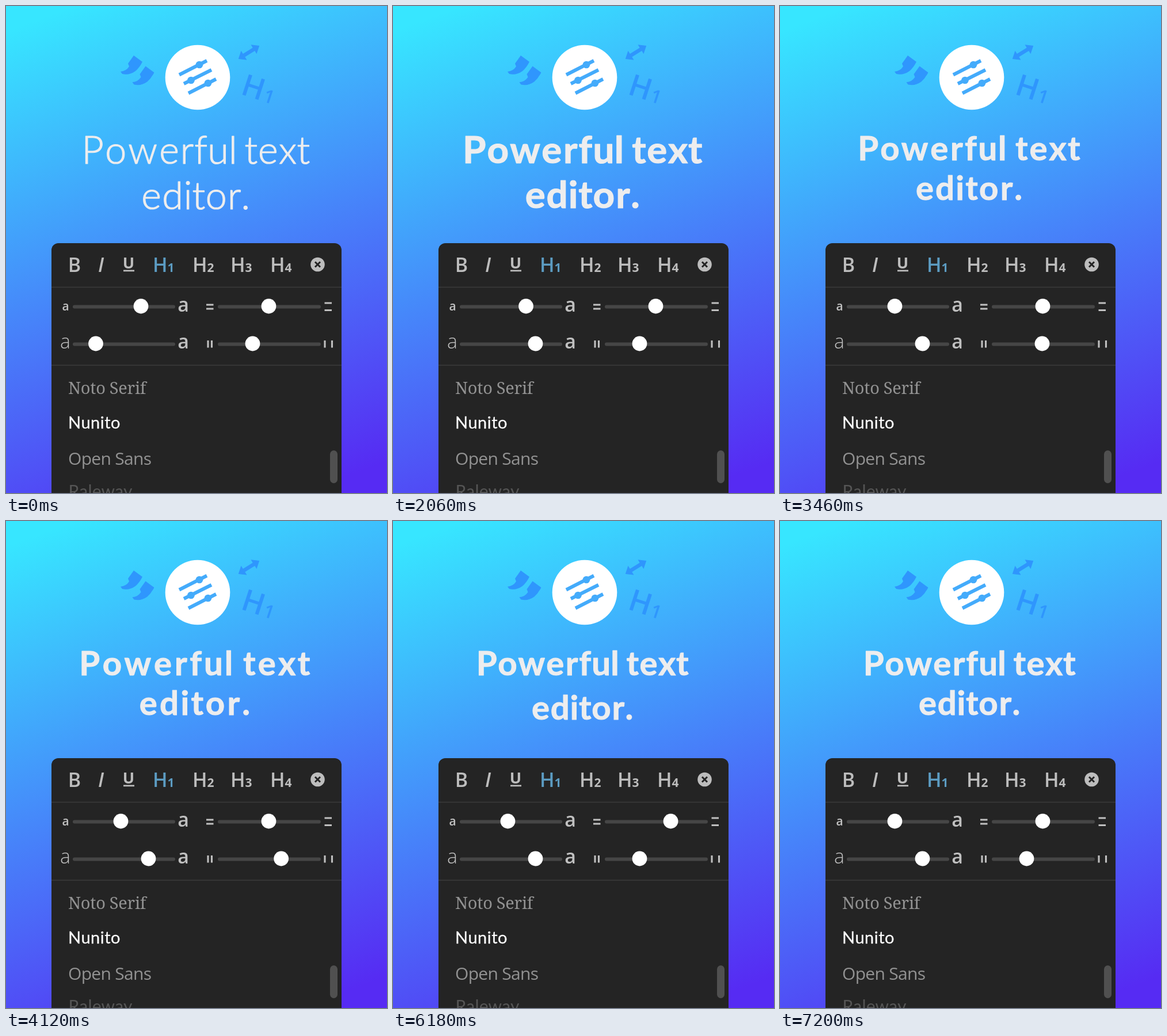
Recreate the animation shown at these times as an HTML page. Size 662x846 px, loop 8000 ms.

```html
<!DOCTYPE html>
<html lang="en">
<head>
<meta charset="utf-8">
<title>Powerful text editor</title>
<style>
html, body { margin: 0; width: 100%; height: 100%; overflow: hidden; }
body { background: linear-gradient(160deg, #37e6ff 4%, #4687fa 50%, #562bf3 95%); }
svg { display: block; width: 662px; height: 846px; font-family: "Open Sans", "Noto Sans", sans-serif; }
#title { font-family: Lato, "Open Sans", sans-serif; fill: #ededee; stroke: #ededee; stroke-linejoin: round; text-anchor: middle; }
.deco { fill: #2f96fd; font-weight: 600; }
.bar { fill: #bdbdbd; font-weight: 600; font-size: 34px; }
.bar .sub { font-size: 21px; font-weight: 700; }
.mid { text-anchor: middle; }
.list { font-size: 30px; fill: #929292; }
.lato { font-family: Lato, sans-serif; }
.track { stroke: #464646; stroke-width: 6; stroke-linecap: round; }
.mark { stroke: #c0c0c0; stroke-width: 3.1; fill: none; }
</style>
</head>
<body>
<svg viewBox="0 0 662 846">
  <g class="deco">
    <path id="quote" d="M222 86L237 97Q232 107 225 113Q214 121 202 118L199 114Q209 113 214 105L212 100Z"/>
    <use href="#quote" x="20.5" y="18.5"/>
    <path transform="translate(422 80.5) rotate(-32)" d="M-21.5 0L-10-9.5V-3.3H10V-9.5L21.5 0L10 9.5V3.3H-10V9.5Z"/>
    <g transform="translate(406 152.5) rotate(18)">
      <text font-size="52">H</text>
      <text x="41" font-size="32">1</text>
    </g>
  </g>

  <circle cx="333" cy="124" r="56.3" fill="#fff"/>
  <path d="M301 119.5L349 95M309 135L357 111M317 151.5L365 127" stroke="#44abfb" stroke-width="6"/>
  <g fill="#44abfb">
    <circle cx="336" cy="102" r="6.3"/>
    <circle cx="321.5" cy="129" r="6.3"/>
    <circle cx="351" cy="134" r="6.3"/>
  </g>

  <g id="title"><text>Powerful text</text><text>editor.</text></g>

  <rect x="79" y="412" width="504" height="460" rx="12" fill="#242424"/>
  <path d="M79 488.5H583M79 624H583" stroke="#3b3b3b" stroke-width="1.5"/>

  <g class="bar">
    <text class="mid" x="119" y="461.5">B</text>
    <text class="mid" x="165" y="461.5" font-style="italic">I</text>
    <text class="mid" x="213" y="456" style="font-size:27px;font-weight:700">U</text>
    <rect x="204" y="458.5" width="19" height="2.7"/>
    <g fill="#5c9cc2"><text x="255" y="461.5">H</text><text class="sub" x="280.5" y="461.5">1</text></g>
    <text x="324" y="461.5">H</text><text class="sub" x="349.5" y="461.5">2</text>
    <text x="390" y="461.5">H</text><text class="sub" x="415.5" y="461.5">3</text>
    <text x="459" y="461.5">H</text><text class="sub" x="484.5" y="461.5">4</text>
    <circle cx="541.5" cy="449" r="12.3"/>
    <path d="M537 444.5l9 9m0-9l-9 9" stroke="#242424" stroke-width="3"/>
  </g>

  <path class="track" d="M119 522.5H291M371 522.5H544M119 587.5H291M371 587.5H544"/>
  <g class="mid" fill="#c0c0c0" font-weight="600">
    <text x="103.5" y="528.5" font-size="21">a</text>
    <text x="308" y="530.5" font-size="34">a</text>
    <text x="103" y="595" font-size="34" font-weight="300">a</text>
    <text x="308" y="595" font-size="34">a</text>
  </g>
  <path class="mark" d="M348 519H360.5M348 526H360.5M553.5 516H566M553.5 528.5H566
    M351 581V593.5M357.5 581V593.5M554 581V593.5M566.5 581V593.5"/>
  <g id="knobs" fill="#fff">
    <circle cy="521.5" r="12.9"/>
    <circle cy="586.5" r="12.9"/>
    <circle cy="521.5" r="12.9"/>
    <circle cy="586.5" r="12.9"/>
  </g>

  <g class="list">
    <text x="108" y="674" font-size="29" letter-spacing="-.3" style="font-family:'Noto Serif',serif">Noto Serif</text>
    <text class="lato" x="108" y="734" font-size="29" letter-spacing=".5" fill="#fff" stroke="#fff" stroke-width=".3">Nunito</text>
    <text x="108" y="797" letter-spacing="-.7">Open Sans</text>
    <text class="lato" x="108.5" y="854" letter-spacing=".2" fill="#555">Raleway</text>
  </g>
  <rect x="563" y="772" width="13" height="57" rx="6.5" fill="#505050"/>
</svg>

<script>
const LOOP = 8000, STEP = 40, CENTER = 328.5;
const lines = document.querySelectorAll('#title text');
const knobs = document.querySelectorAll('#knobs circle');

// letter advances in em: [light, bold]
const advance = {
  P: [.627, .645], o: [.552, .575], w: [.82, .82], e: [.531, .555], r: [.38, .41],
  f: [.33, .37], u: [.556, .575], l: [.205, .23], ' ': [.2, .22], t: [.338, .377],
  x: [.474, .525], d: [.556, .575], i: [.225, .26], '.': [.2, .24]
};
// font weights with their stem width in em
const faces = [[300, .042], [400, .08], [700, .124]];

const mix = (a, b, p) => a + (b - a) * p;
const ease = p => p < .5 ? 2 * p * p : 1 - 2 * (1 - p) ** 2;

// eased progress of a move made of n steps
function move(t, first, n) {
  const k = Math.floor((t - first) / STEP) + 1;
  return ease(Math.min(Math.max(k / n, 0), 1));
}

function setLine(el, y, size, weight, spacing) {
  const stem = mix(.06, .141, weight) * size;
  const face = faces.filter(f => f[1] * size <= stem).pop();
  const stroke = stem - face[1] * size;
  const letters = [...el.textContent];
  const widths = letters.map(c => (mix(...advance[c], weight) + spacing) * size);
  let x = CENTER - widths.reduce((a, b) => a + b) / 2;
  const xs = widths.map(w => (x += w) - w / 2 - spacing * size / 2);
  el.setAttribute('x', xs.map(v => v.toFixed(2)).join(' '));
  el.setAttribute('y', y - stroke / 2);
  el.setAttribute('font-size', size * .983 - stroke * 1.2);
  el.setAttribute('font-weight', face[0]);
  el.setAttribute('stroke-width', stroke);
}

function draw(t) {
  const weight = move(t, 500, 14);
  const shrink = move(t, 2020, 9);
  const track = move(t, 3340, 8) - move(t, 4120, 5);
  const leadKnob = 456.5 + 55.5 * move(t, 5280, 7) - 99.5 * move(t, 6020, 13) + 44 * move(t, 7000, 6);

  const size = mix(69, 60.4, shrink);
  const spacing = -.0075 + .048 * track;
  const base = 226 + .7 * size;
  setLine(lines[0], base, size, weight, spacing);
  setLine(lines[1], base + 1.15 * size + (leadKnob - 456.5) * .31, size, weight, spacing);

  [mix(234.5, 199.5, shrink), mix(156, 247.5, weight), leadKnob, mix(428.5, 482.5, track)]
    .forEach((x, i) => knobs[i].setAttribute('cx', x));
}

const start = performance.now();
function tick() {
  draw((performance.now() - start) % LOOP);
  requestAnimationFrame(tick);
}
tick();
</script>
</body>
</html>
```
